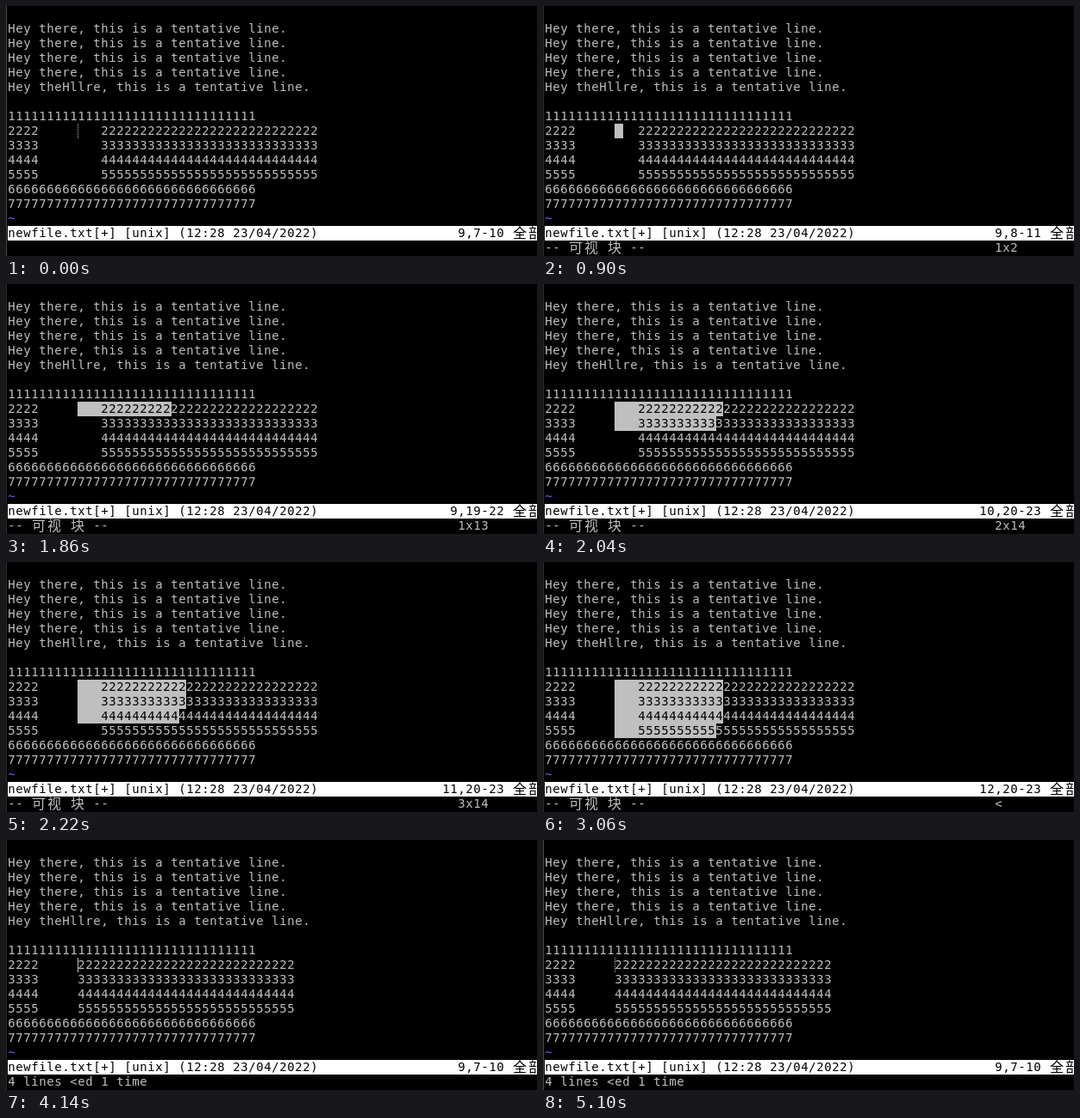
Animation, 616 px wide and 291 px high, one loop 5160 ms. Source, as an HTML page with a canvas:

```html
<!DOCTYPE html>
<html lang="en">
<head>
<meta charset="utf-8">
<style>
html, body { margin: 0; height: 100%; overflow: hidden; background: #000; }
canvas { display: block; }
</style>
</head>
<body>
<canvas id="screen" width="616" height="291"></canvas>
<script>
const ctx = document.getElementById('screen').getContext('2d');
const LOOP = 5160, CELL = 9, LINE = 17, GRAY = '#bfbfbf';
const FIRST_ROW = 8, FIRST_COL = 9;
const x = col => 2 + col * CELL;
const y = row => 1 + row * LINE;

function box(col, row, cells, color) {
  ctx.fillStyle = color;
  ctx.fillRect(x(col), y(row), cells * CELL, LINE);
}

// Terminal text: one cell per character, two for wide ones.
function write(text, col, row, color = GRAY) {
  ctx.fillStyle = color;
  for (const ch of text) {
    const wide = ch > '\u2e80';
    ctx.font = wide ? '16px "Noto Sans CJK SC", "Noto Sans CJK", sans-serif'
                    : '14px "DejaVu Sans Mono", monospace';
    ctx.fillText(ch, x(col) + (wide ? 1 : 0.3), y(row) + 13 + (wide ? 1 : 0));
    col += wide ? 2 : 1;
  }
}

// Size of the block selection at time t.
function selection(t) {
  if (t < 660 || t >= 3120) return null;
  const rows = t < 2040 ? 1 : t < 2220 ? 2 : t < 2640 ? 3 : 4;
  let cols = 1 + (t >= 900) + (t >= 1080);
  if (t >= 1560) cols = Math.min(14, 4 + Math.round(1.8 * Math.floor((t - 1560) / 60)));
  return { rows, cols };
}

function drawText(shifted) {
  for (let row = 1; row <= 5; row++)
    write(row < 5 ? 'Hey there, this is a tentative line.'
                  : 'Hey theHllre, this is a tentative line.', 0, row);
  for (let n = 1; n <= 7; n++) {
    const digit = String(n), row = n + 6;
    if (n > 1 && n < 6) {
      write(digit.repeat(4), 0, row);
      write(digit.repeat(28), shifted ? 9 : 12, row);
    } else write(digit.repeat(32), 0, row);
  }
  write('~', 0, 14, '#6060ff');
}

function drawSelection({ rows, cols }) {
  for (let i = 0; i < rows; i++) {
    const row = FIRST_ROW + i;
    const cells = i === rows - 1 ? cols - 1 : cols;
    box(FIRST_COL, row, cells, GRAY);
    const digits = FIRST_COL + cells - 12;
    if (digits > 0) write(String(i + 2).repeat(digits), 12, row, '#000');
  }
}

function drawCursor(col, row, focused) {
  ctx.fillStyle = GRAY;
  if (focused) ctx.fillRect(x(col), y(row), 1, LINE);
  else for (let i = 0; i < LINE; i += 2) ctx.fillRect(x(col), y(row) + i, 1, 1);
}

function drawStatus(t, block) {
  const { rows, cols } = block || { rows: 1, cols: 1 };
  ctx.fillStyle = '#fff';
  ctx.fillRect(2, y(15), 614, LINE);
  write('newfile.txt[+] [unix] (12:28 23/04/2022)', 0, 15, '#000');
  const place = `${8 + rows},${6 + cols}-${9 + cols}`;
  write(place, 64 - place.length, 15, '#000');
  write('全部', 65, 15, '#000');
  if (block) {
    write('-- 可视 块 --', 0, 16);
    write(t >= 3060 ? '<' : `${rows}x${cols}`, 58, 16);
  } else if (t >= 3120) write('4 lines <ed 1 time', 0, 16);
}

function draw(t) {
  const focused = t >= 300 && t < 5100;
  const block = selection(t);
  const { rows, cols } = block || { rows: 1, cols: 1 };
  ctx.fillStyle = '#000';
  ctx.fillRect(0, 0, 616, 291);
  ctx.fillStyle = focused ? '#2b2b2b' : '#4a4a4a';
  ctx.fillRect(0, 0, 1, 291);
  drawText(t >= 3120);
  if (block) drawSelection(block);
  drawStatus(t, block);
  const blinkedOff = (t >= 3600 && t < 4140) || (t >= 4620 && t < 5100);
  if (!blinkedOff) drawCursor(FIRST_COL + cols - 1, FIRST_ROW + rows - 1, focused);
}

function tick() {
  draw(performance.now() % LOOP);
  requestAnimationFrame(tick);
}
tick();
</script>
</body>
</html>
```
